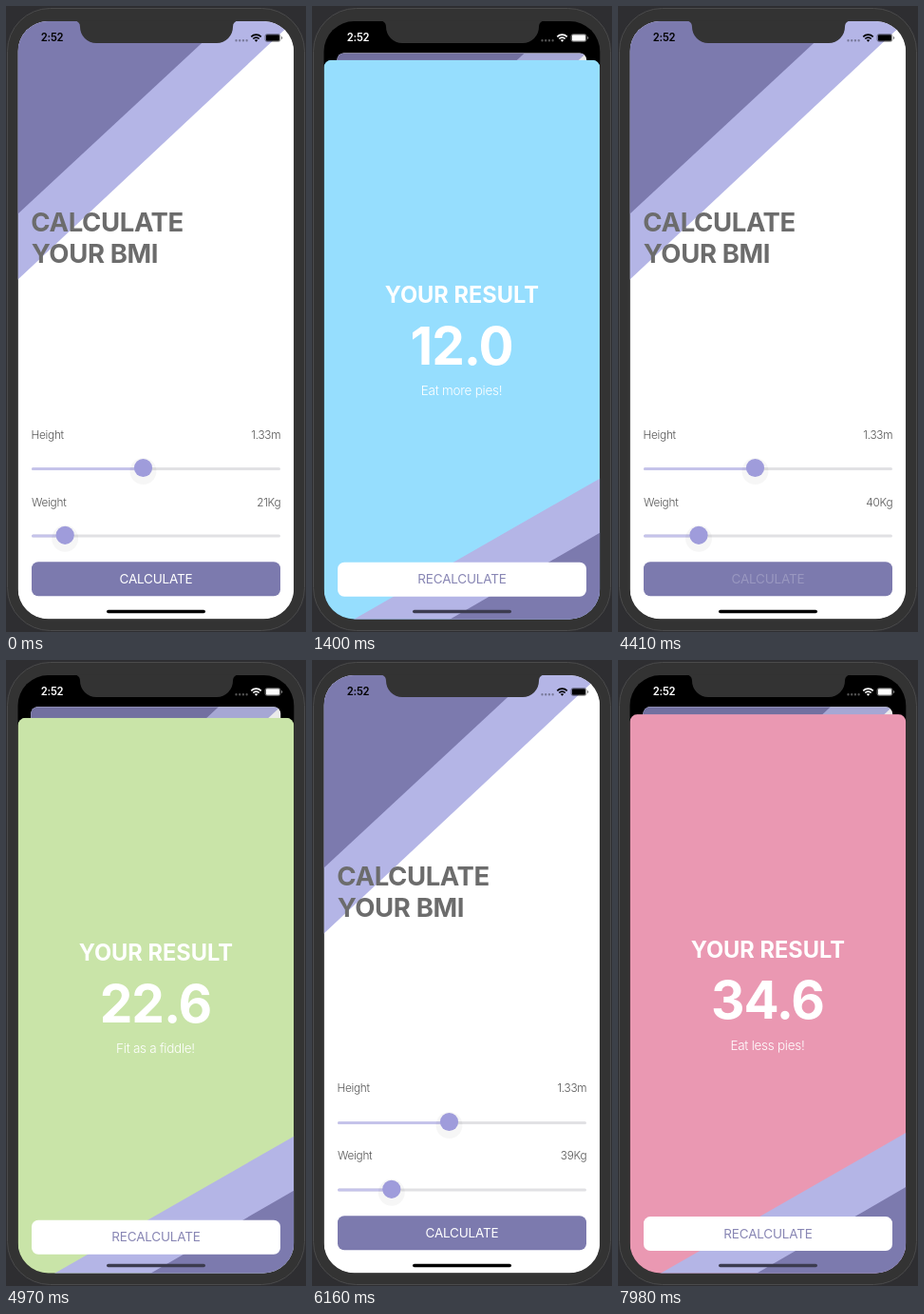
An HTML page that plays this animation: 316 by 658 pixels, repeating every 8 s.

```html
<!DOCTYPE html>
<html lang="en">
<head>
<meta charset="utf-8">
<title>BMI calculator</title>
<style>
  html, body { margin: 0; width: 100%; height: 100%; overflow: hidden; background: #2e2e31; }
  svg { display: block; width: 316px; height: 658px; }
  text { font-family: Inter, Roboto, sans-serif; font-optical-sizing: none; letter-spacing: -.02em; }
  .title { font-size: 27.5px; font-weight: 700; letter-spacing: -.014em; fill: #6c6c6c; }
  .label { font-size: 11.8px; font-weight: 300; letter-spacing: -.022em; fill: #555; }
  .button { font-size: 13.5px; font-weight: 400; letter-spacing: -.015em; }
  .mid { text-anchor: middle; }
  .end { text-anchor: end; }
  .dark { fill: #7c7aae; }
  .light { fill: #b4b5e6; }
  .track { fill: #e1e1e4; }
  .filled { fill: #c5c3ea; }
</style>
</head>
<body>
<svg viewBox="0 0 316 658">
  <defs>
    <clipPath id="screen"><rect x="12.5" y="16" width="290.8" height="628.4" rx="32"/></clipPath>
    <clipPath id="card"><rect id="cardShape" x="12.5" y="16" width="290.8" height="628.4"/></clipPath>
    <clipPath id="sheetClip"><rect x="12.5" y="57" width="290.8" height="640" rx="8"/></clipPath>
    <g id="knob">
      <circle cy="3.5" r="14" opacity=".035"/>
      <circle r="9.6" fill="#9f9cdb"/>
    </g>
  </defs>

  <rect x="1.5" y="2.5" width="313" height="654" rx="45" fill="#333" stroke="#4a4a4b"/>

  <g clip-path="url(#screen)">
    <rect width="316" height="658"/>
    <g id="page">
      <g clip-path="url(#card)">
        <rect width="316" height="658" fill="#fff"/>
        <path class="light" d="M12 16H303L12 288z"/>
        <path class="dark" d="M12 16H231L12 219z"/>
        <text class="title" x="26.3" y="237">CALCULATE</text>
        <text class="title" x="26.8" y="270">YOUR BMI</text>

        <text class="label" x="26.5" y="454.5">Height</text>
        <text class="label end" x="289.3" y="454.5">1.33m</text>
        <rect class="track" x="27" y="485" width="262" height="3" rx="1.5"/>
        <rect class="filled" x="27" y="485" width="117" height="3" rx="1.5"/>
        <use href="#knob" x="144.5" y="485.5"/>

        <text class="label" x="27" y="525.5">Weight</text>
        <text class="label end" id="kilos" x="289.3" y="525.5"></text>
        <rect class="track" x="27" y="555.5" width="262" height="3" rx="1.5"/>
        <rect class="filled" id="kilosFill" x="27" y="555.5" height="3" rx="1.5"/>
        <use href="#knob" id="kilosKnob" y="556.3"/>

        <rect class="dark" x="27" y="584.3" width="262" height="36" rx="7"/>
        <text class="button mid" id="calculate" x="158" y="607" fill="#fff">CALCULATE</text>
        <rect id="shade" width="316" height="658"/>
      </g>
    </g>

    <g id="sheet">
      <g clip-path="url(#sheetClip)">
        <rect id="sheetColor" x="12" y="57" width="292" height="640"/>
        <path class="light" d="M304 496.5L-47 697H304z"/>
        <path class="dark" d="M304 553.5L55 697H304z"/>
      </g>
      <g class="mid" fill="#fff">
        <text x="157.8" y="312.5" font-size="23.6" font-weight="700" style="letter-spacing: 0">YOUR RESULT</text>
        <text id="bmi" x="157.5" y="377.2" font-size="55" font-weight="700"></text>
        <text id="advice" x="157.5" y="409.5" font-size="13.5" font-weight="300"></text>
        <rect x="27" y="585" width="262" height="36" rx="7"/>
      </g>
      <text class="button mid" id="recalculate" x="158" y="607.6" fill="#8886b4">RECALCULATE</text>
    </g>
    <rect id="home" x="106" y="634.7" width="104" height="3.6" rx="1.8"/>
  </g>

  <path fill="#333" d="M72 15.5Q78 16 78 22A17 17 0 0 0 95 39H222A17 17 0 0 0 239 22Q239 16 245 15.5z"/>

  <g id="status" fill="currentColor">
    <text x="36.8" y="37.3" font-size="11.2" font-weight="600">2:52</text>
    <path d="M242.5 36.3h12" stroke="currentColor" stroke-width="2.4" stroke-linecap="round" stroke-dasharray="0 3.7" opacity=".32"/>
    <g fill="none" stroke="currentColor" stroke-width="1.7">
      <path d="M258.3 32.3a7.3 7.3 0 0 1 10.4 0M260.3 34.5a4.5 4.5 0 0 1 6.4 0"/>
    </g>
    <path d="M261.7 35.8q1.8-1.3 3.6 0L263.5 37.8z"/>
    <rect x="273" y="29.5" width="16" height="8" rx="2.2" fill="none" stroke="currentColor" stroke-width=".8" opacity=".45"/>
    <rect x="273.8" y="30.2" width="14.4" height="6.6" rx="1.3"/>
    <path d="M290 32v3q1.2-.4 1.2-1.5T290 32" opacity=".5"/>
  </g>
</svg>

<script>
const LOOP = 8000;
const STIFFNESS = 14.5;
const SHEET_TRAVEL = 587.6;
const visits = [
  { press: 560, leave: 1680, bmi: '12.0', advice: 'Eat more pies!', color: '#96defe' },
  { press: 4340, leave: 5180, bmi: '22.6', advice: 'Fit as a fiddle!', color: '#c9e4a8' },
  { press: 7210, leave: Infinity, bmi: '34.6', advice: 'Eat less pies!', color: '#ea98b2' }
];
// Weight drags: start, end, from kg, to kg
const drags = [
  [2960, 3400, 21, 34],
  [3450, 3920, 34, 40],
  [6080, 6100, 40, 39],
  [6320, 6800, 39, 61]
];

const el = id => document.getElementById(id);
const clamp = x => Math.min(1, Math.max(0, x));
const mix = (a, b, k) => a + (b - a) * k;
const set = (id, attrs) => {
  for (const name in attrs) el(id).setAttribute(name, attrs[name]);
};

// Critically damped spring from 0 to 1
function spring(ms) {
  const x = Math.max(0, ms) / 1000 * STIFFNESS;
  return 1 - (1 + x) * Math.exp(-x);
}

// Button text dims on touch, then fades back
function pressOpacity(ms) {
  return ms < 0 ? 1 : mix(.22, 1, clamp((ms - 130) / 250));
}

function weightAt(t) {
  let kg = drags[0][2];
  for (const [start, end, from, to] of drags) {
    if (t < start) break;
    const k = clamp((t - start) / (end - start));
    kg = mix(from, to, k * k * (3 - 2 * k));
  }
  return kg;
}

function draw(t) {
  const visit = visits.filter(v => t >= v.press).pop() || visits[0];
  const open = spring(t - visit.press - 150) * (1 - spring(t - visit.leave - 100));

  const kg = weightAt(t);
  const knobX = 62.2 + (kg - 21) * 1.2;
  el('kilos').textContent = Math.round(kg) + 'Kg';
  set('kilosFill', { width: knobX - 27 });
  set('kilosKnob', { x: knobX });

  const scale = mix(1, .903, open);
  set('page', { transform: `translate(${mix(13, 27, open)} ${mix(16, 49.4, open)}) scale(${scale}) translate(-13 -16)` });
  set('cardShape', { rx: mix(30, 8, open) });
  set('shade', { opacity: .08 * open });
  set('calculate', { opacity: pressOpacity(t - visit.press) });

  set('sheet', {
    transform: `translate(0 ${SHEET_TRAVEL * (1 - open) - .6})`,
    visibility: open > .001 ? 'visible' : 'hidden'
  });
  set('sheetColor', { fill: visit.color });
  set('recalculate', { opacity: pressOpacity(t - visit.leave) });
  el('bmi').textContent = visit.bmi;
  el('advice').textContent = visit.advice;

  const white = 255 * open;
  el('status').style.color = `rgb(${white}, ${white}, ${white})`;
  set('home', { fill: `rgb(${60 * open}, ${60 * open}, ${80 * open})` });
}

const begin = performance.now();
function frame() {
  draw((performance.now() - begin) % LOOP);
  requestAnimationFrame(frame);
}
frame();
</script>
</body>
</html>
```
